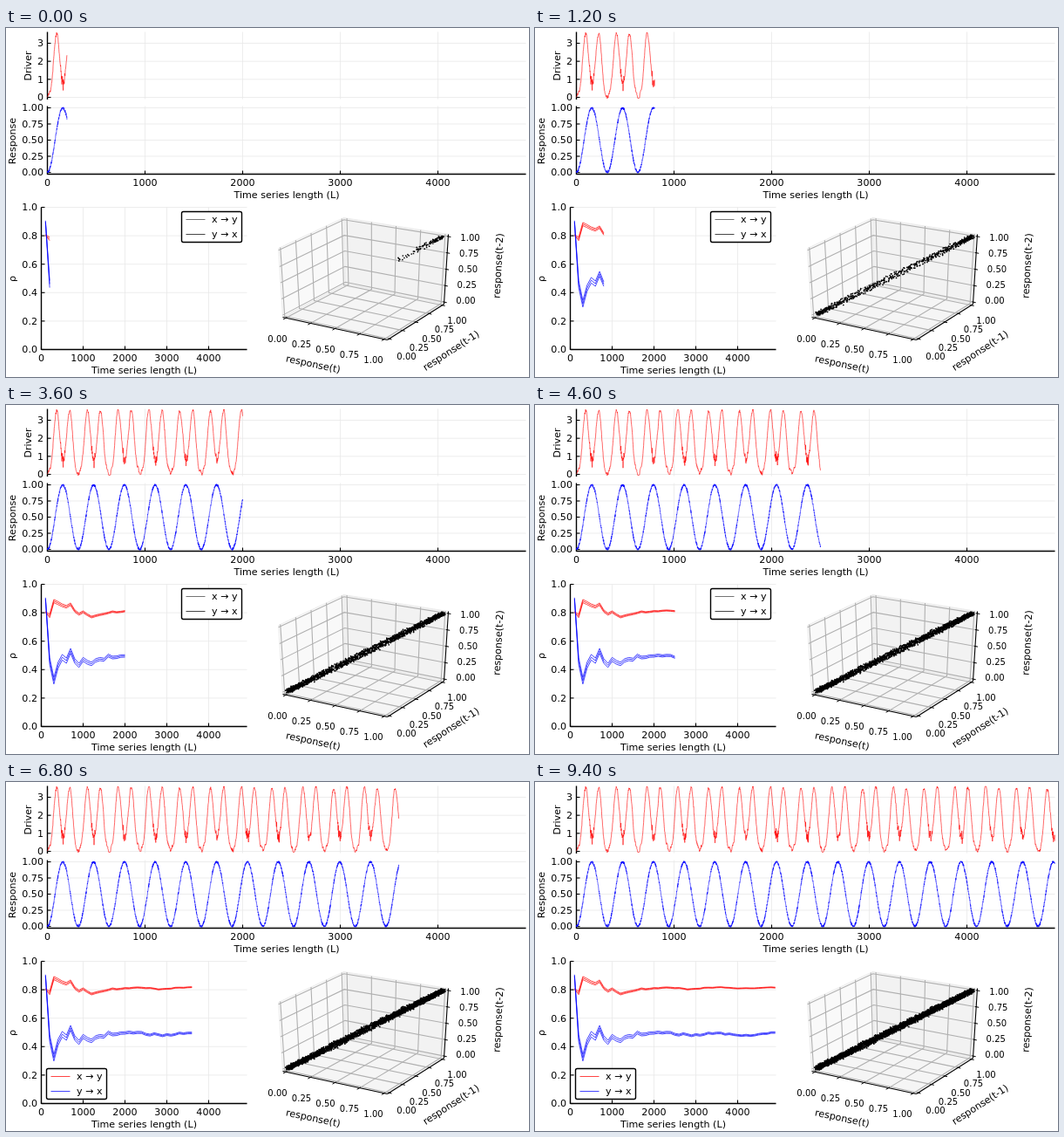
These frames come from a looping animation (600 by 400 pixels, 9600 ms). An HTML page:

```html
<!DOCTYPE html>
<html lang="en">
<head>
<meta charset="utf-8">
<title>Convergence of cross mapping</title>
<style>
html, body { margin: 0; width: 600px; height: 400px; overflow: hidden; background: #fff; }
svg { display: block; font: 11.11px "DejaVu Sans", sans-serif; }
path { fill: none; }
.thin { shape-rendering: crispEdges; }
</style>
</head>
<body>
<!-- half-pixel offset: whole coordinates fall on pixel centres -->
<svg id="stage" width="600" height="400" viewBox="-0.5 -0.5 600 400"></svg>
<script>
const stage = document.getElementById('stage');
const LOOP = 9600, STEP = 200, LAST = 4900, LEGEND_MOVE = 3400;
const RED = '#f00', BLUE = '#00f';

function add(tag, attrs, parent = stage) {
  const el = document.createElementNS('http://www.w3.org/2000/svg', tag);
  for (const key in attrs) el.setAttribute(key, attrs[key]);
  parent.appendChild(el);
  return el;
}
function line(x1, y1, x2, y2, stroke = '#000', width = 1.1, parent = stage) {
  return add('line', { x1, y1, x2, y2, stroke, 'stroke-width': width }, parent);
}
function label(text, x, y, { anchor = 'middle', turn = 0, size = 11.11, parent = stage } = {}) {
  // y is the vertical middle of the text
  const el = add('text', {
    x, y: y + size * 0.36, 'text-anchor': anchor, 'font-size': size,
    transform: `rotate(${turn} ${x} ${y})`
  }, parent);
  el.textContent = text;
}
function curve(stroke, width, name = 'thin') {
  return add('path', { stroke, 'stroke-width': width, 'stroke-linejoin': 'round', class: name });
}

// Seeded noise in -1..1, roughly bell shaped
let seed = 20177;
function rand() {
  seed = (seed * 1664525 + 1013904223) % 4294967296;
  return seed / 4294967296;
}
const noise = () => (rand() + rand() + rand()) / 1.5 - 1;

// Flat axes
function axes({ left, right, top, bottom, xs, ys, base }) {
  const grid = '#e9e9e9';
  xs.forEach(([x]) => line(x, top, x, bottom, grid, 0.8));
  ys.forEach(([y]) => line(left, y, right, y, grid, 0.8));
  line(left, top, left, bottom + 0.5, '#000', 1.4);
  ys.forEach(([y, text]) => {
    line(left, y, left + 4, y);
    label(text, left - 4.5, y, { anchor: 'end' });
  });
  if (!base) return;
  line(left, bottom, right, bottom, '#000', 1.4);
  xs.forEach(([x, text]) => {
    line(x, bottom, x, bottom - 4);
    label(text, x, bottom + 10);
  });
}
const thousands = [0, 1, 2, 3, 4];
const longX = thousands.map(i => [47 + 112 * i, i * 1000]);
const shortX = thousands.map(i => [40 + 48 * i, i * 1000]);
const quarters = [0, 0.25, 0.5, 0.75, 1];

axes({ left: 47, right: 596, top: 4, bottom: 81, xs: longX,
  ys: [0, 1, 2, 3].map(v => [79 - 20.67 * v, v]) });
axes({ left: 47, right: 596, top: 89, bottom: 167, xs: longX, base: true,
  ys: quarters.map(v => [165 - 74 * v, v.toFixed(2)]) });
axes({ left: 40, right: 276, top: 205, bottom: 368, xs: shortX, base: true,
  ys: [0, 1, 2, 3, 4, 5].map(i => [368 - 32.6 * i, (i / 5).toFixed(1)]) });
label('Driver', 25, 43, { turn: -90 });
label('Response', 7, 129, { turn: -90 });
label('ρ', 7, 287, { turn: -90 });
label('Time series length (L)', 321.5, 191);
label('Time series length (L)', 158, 392);

// Box of the 3D plot
const P = {
  front: [317, 331], near: [437, 357], right: [502, 316], back: [389, 293],
  frontTop: [312, 252], backTop: [387, 217], rightTop: [507, 236]
};
const mix = (a, b, f) => [a[0] + (b[0] - a[0]) * f, a[1] + (b[1] - a[1]) * f];
function pane(fill, ...names) {
  add('polygon', { points: names.map(n => P[n]).join(' '), fill, stroke: '#e8e8e8', 'stroke-width': 0.8 });
}
pane('#f9f9f9', 'front', 'back', 'backTop', 'frontTop');
pane('#f2f2f2', 'back', 'right', 'rightTop', 'backTop');
pane('#f5f5f5', 'front', 'near', 'right', 'back');

function bend(f, ...edges) {
  const points = edges.map(([a, b]) => mix(P[a], P[b], f)).join(' ');
  add('polyline', { points, fill: 'none', stroke: '#b0b0b0', 'stroke-width': 1.1 });
}
const inset = v => 0.03 + 0.94 * v;
for (const v of quarters) {
  const f = inset(v);
  bend(f, ['front', 'near'], ['back', 'right'], ['backTop', 'rightTop']);
  bend(f, ['frontTop', 'backTop'], ['front', 'back'], ['near', 'right']);
  bend(f, ['front', 'frontTop'], ['back', 'backTop'], ['right', 'rightTop']);
}
function edge3d(a, b, tick, from, to) {
  line(...P[a], ...P[b], '#000', 1.1);
  for (const v of quarters) {
    const [x, y] = mix(P[a], P[b], inset(v));
    line(x - tick[0] * 0.4, y - tick[1] * 0.4, x + tick[0], y + tick[1], '#000', 1);
    label(v.toFixed(2), ...mix(from, to, v), { size: 10 });
  }
}
edge3d('front', 'near', [-3, 1.7], [311, 356], [421, 380]);
edge3d('near', 'right', [3, 0.7], [459, 376], [517, 335]);
edge3d('right', 'rightTop', [3, 0.6], [527, 312], [532, 240]);
label('response(t)', 352, 384.5, { turn: 12 });
label('response(t-1)', 510, 369, { turn: -33 });
label('response(t-2)', 564, 272, { turn: -87 });

// Time series: the driver has two peaks in each period of the response
const RATE = 50.17;
function driver(t) {
  const a = (t - 4) / RATE, c = Math.cos;
  const dip = 0.2 * Math.exp(-(((1 - c(a)) / 0.03) ** 2));
  return 1.75 - 0.734 * c(a) - 1.406 * c(2 * a) + 0.434 * c(3 * a) + 0.15 * c(4 * a) - dip;
}
const px = v => v.toFixed(1);
const driverPts = [], responsePts = [], response = [], dots = [];
let drift = 0;
for (let t = 0; t <= LAST; t++) {
  const clean = (1 - Math.cos(t / RATE)) / 2;
  response.push(clean + 0.034 * noise());
  const x = px(47 + 0.112 * t);
  if (t % 2 === 0) {
    drift = drift * 0.85 + 0.1 * noise();
    const rough = 0.08 + 0.45 * Math.exp(-(((1 + Math.cos(t / RATE)) / 0.09) ** 2));
    const v = Math.min(3.6, Math.max(-0.05, driver(t) + drift + rough * noise()));
    driverPts.push([t, `${x} ${px(79 - 20.67 * v)}`]);
  }
  const shown = Math.min(1.01, Math.max(-0.01, response[t]));
  responsePts.push([t, `${x} ${px(165 - 74 * shown)}`]);
  if (t >= 100) {
    const a = response[t], b = response[t - 1], c = response[t - 2];
    dots.push(`M${px(324 + 112 * a + 62 * b + 2 * c)} ${px(327 + 24 * a - 38 * b - 74 * c)}h.01`);
  }
}

// Skill ρ in thousandths for L = 100, 200, ...
const skillXY = [805, 778, 882, 868, 852, 842, 860, 812, 790, 806, 786, 770, 779, 786, 792, 799, 808, 803,
  806, 811, 810, 814, 816, 814, 811, 812, 808, 802, 805, 807, 808, 814, 815, 814, 817, 818, 815, 814,
  811, 809, 810, 811, 810, 810, 812, 814, 816, 817, 815];
const skillYX = [900, 460, 322, 430, 487, 463, 532, 460, 430, 472, 452, 440, 465, 474, 470, 499, 485, 487,
  495, 496, 501, 496, 500, 499, 486, 481, 491, 484, 476, 485, 480, 486, 496, 491, 496, 496, 486, 490,
  484, 480, 477, 481, 477, 480, 487, 491, 491, 499, 499];
function skillPath(skill, L, shift) {
  const pts = skill.slice(0, L / 100).map((r, i) => {
    const spread = i ? 5 + 22 * Math.exp(-i / 10) : 6;
    return `${px(44.8 + 4.8 * i)} ${px(368 - 0.163 * (r + shift * spread))}`;
  });
  return 'M' + pts.join('L');
}

const driverLine = curve(RED, 0.6), responseLine = curve(BLUE, 0.6);
const skillLines = [[skillXY, RED, 0.5], [skillYX, BLUE, 1]].flatMap(([skill, color, wide]) =>
  [-1, 0, 1].map(side => ({ skill, shift: side * wide, el: curve(color, 0.7) })));
const cloud = curve('#000', 1.7, 'cloud');
cloud.setAttribute('stroke-linecap', 'round');

const legend = add('g', {});
add('rect', { x: 201, y: 210, width: 69, height: 35, rx: 2, fill: '#fff', stroke: '#000', 'stroke-width': 1.4 }, legend);
const keys = ['x → y', 'y → x'].map((text, i) => {
  const y = 219 + 17 * i;
  label(text, 235.5, y, { anchor: 'start', parent: legend });
  return line(206, y, 228, y, '#000', 0.9, legend);
});

function draw(L) {
  const upTo = pts => 'M' + pts.filter(p => p[0] <= L).map(p => p[1]).join('L');
  driverLine.setAttribute('d', upTo(driverPts));
  responseLine.setAttribute('d', upTo(responsePts));
  for (const { skill, shift, el } of skillLines) el.setAttribute('d', skillPath(skill, L, shift));
  cloud.setAttribute('d', dots.slice(0, L - 99).join(''));
  const moved = L >= LEGEND_MOVE;
  legend.setAttribute('transform', moved ? 'translate(-155 118)' : 'translate(0 0)');
  keys[0].setAttribute('stroke', moved ? '#ff3030' : '#666');
  keys[1].setAttribute('stroke', moved ? '#3030ff' : '#333');
}

let shown = 0;
const start = performance.now();
function tick() {
  const time = (performance.now() - start) % LOOP;
  const L = 200 + 100 * Math.floor(time / STEP);
  if (L !== shown) draw(shown = L);
  requestAnimationFrame(tick);
}
tick();
</script>
</body>
</html>
```
